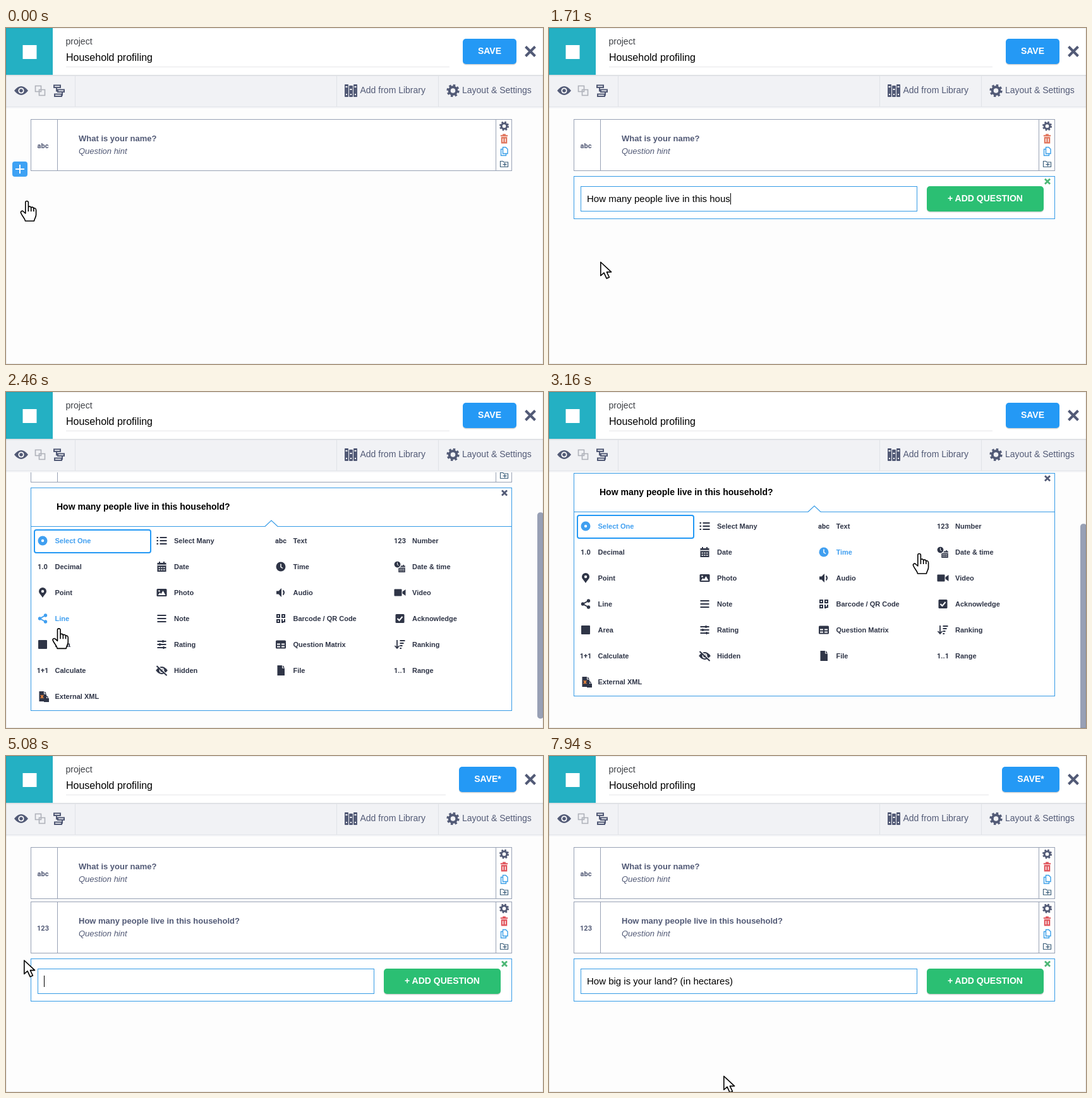
Write an HTML page that moves like this. It is 850 by 531 pixels and loops after 8000 ms.

```html
<!DOCTYPE html>
<html lang="en">
<head>
<meta charset="utf-8">
<title>Form builder</title>
<style>
html, body { margin: 0; width: 100%; height: 100%; overflow: hidden; background: #fdfdfd; }
svg { display: block; font-family: "Liberation Sans", Arial, sans-serif; }
#stage { width: 100%; height: 100%; }
text { white-space: pre; }
.glyph { font: bold 11px Roboto, sans-serif; text-anchor: middle; }
.ink { fill: currentColor; }
.line { fill: none; stroke: currentColor; stroke-width: 2; }
.white { fill: #fff; }
.cut { fill: none; stroke: #fff; stroke-width: 1.5; }
</style>
</head>
<body>
<svg id="stage" viewBox="0 0 850 531"></svg>
<script>
const LOOP = 8000;
const BLUE = '#2499f5', SLATE = '#525a76', DARK = '#2f3547', GREEN = '#2bbf73';
const FIRST = 'How many people live in this household?';
const SECOND = 'How big is your land? (in hectares)';

// drawing helpers
const path = (d, cls = 'ink', extra = '') => `<path class="${cls}" d="${d}" ${extra}/>`;
const rect = (x, y, w, h, attrs) => `<rect x="${x}" y="${y}" width="${w}" height="${h}" ${attrs}/>`;
const disc = (x, y, r, cls = 'ink') => `<circle class="${cls}" cx="${x}" cy="${y}" r="${r}"/>`;
const label = (x, y, size, fill, str, extra = '') =>
  `<text x="${x}" y="${y}" font-size="${size}" fill="${fill}" ${extra}>${str.replace(/&/g, '&amp;')}</text>`;
const at = (x, y, color, body, scale = 1) =>
  `<g transform="translate(${x} ${y}) scale(${scale})" style="color:${color}">${body}</g>`;
const glyph = str => `<text class="glyph ink" y="4">${str}</text>`;
const outline = color => `fill="none" stroke="${color}"`;
const BOLD = 'font-weight="bold"';

// icons, centred on 0,0
const eye = path('M-11 0Q0-14 11 0Q0 14-11 0Z') + disc(0, 0, 4.6, 'white') + disc(0, 0, 2.8);
const gear = '<circle class="line" r="5.8" style="stroke-width:4"/>' +
  '<circle class="line" r="8.6" style="stroke-width:3" stroke-dasharray="3.5 3.254"/>';
const cross = path('M-4-4L4 4M4-4L-4 4', 'line', 'style="stroke-width:2.8"');
const bars = path('M-7-5H7M-7 0H7M-7 5H7', 'line');
const clock = disc(0, 0, 7.5) + path('M0-4.5V.5L3 2.5', 'cut');
const calendar = path('M-7-6h2.500v-2h2v2h5v-2h2v2H7V8H-7Z') +
  path('M-7-2.500H7', 'cut') + path('M-5 1.500H5M-5 5H5', 'cut', 'stroke-dasharray="2.500 1.250"');
const page = path('M-5.500-8H2V-3.500H6V8H-5.500ZM3-8L6-4.500H3Z');
const trash = path('M-6-6h3.500v-2h5v2H6v2H-6ZM-5-3H5V8H-5Z') + path('M-2-.500V5.500M2-.500V5.500', 'cut');
const copy = path('M-2-6.500H2.500L5.500-3.500V3.500H-2Z M-2-3.500H-5V6.500H3V3.500', 'line', 'style="stroke-width:1.4"');
const folder = path('M-6-4.500h4l1.500 1.500H6V4.500H-6Z', 'line', 'style="stroke-width:1.2"') +
  path('M-2 .700H4M1-2V3.500', 'line', 'style="stroke-width:1.3"');

const ITEMS = [
  ['Select One', disc(0, 0, 7.5) + disc(0, 0, 2.2, 'white')],
  ['Select Many', path('M-3-5H8M-3 0H8M-3 5H8M-8-5h2.500M-8 0h2.500M-8 5h2.500', 'line')],
  ['Text', glyph('abc')],
  ['Number', glyph('123')],
  ['Decimal', glyph('1.0')],
  ['Date', calendar],
  ['Time', clock],
  ['Date & time', `<g transform="translate(3 3) scale(.75)">${calendar}</g>` + disc(-3.5, -3, 5.5, 'white') +
    `<g transform="translate(-4 -3.500) scale(.65)">${clock}</g>`],
  ['Point', path('M0 8C-3 3-6 1-6-2A6 6 0 0 1 6-2C6 1 3 3 0 8Z') + disc(0, -2, 2.2, 'white')],
  ['Photo', rect(-8, -6, 16, 12, 'rx="1.5" class="ink"') + path('M-6 4l3-4 2 2 3-5 4 7Z', 'white') + disc(-4, -2.5, 1.3, 'white')],
  ['Audio', path('M-7-2.500h3.500L1-7V7L-3.500 2.500H-7Z') + path('M3.500-3.500Q6.500 0 3.500 3.500', 'line')],
  ['Video', rect(-9, -5.500, 12, 11, 'rx="1" class="ink"') + path('M4-1.500L9-5V5L4 1.500Z')],
  ['Line', disc(4.5, -5, 2.7) + disc(-4.5, 0, 2.7) + disc(4.5, 5, 2.7) + path('M4.500-5L-4.500 0L4.500 5', 'line')],
  ['Note', bars],
  ['Barcode / QR Code', path('M-6-6h4v4h-4ZM2-6h4v4h-4ZM-6 2h4v4h-4Z', 'line') + path('M1 1h2v3h2v-3h2v5h-3v1h-3Z')],
  ['Acknowledge', rect(-7, -7, 14, 14, 'rx="1.5" class="ink"') + path('M-4 0L-1 3L4-3', 'cut', 'style="stroke-width:2"')],
  ['Area', rect(-7, -7, 14, 14, 'rx="1" class="ink"')],
  ['Rating', bars + path('M2-7v4M-3-2v4M3 3v4', 'line')],
  ['Question Matrix', rect(-8, -6.500, 16, 13, 'rx="1.5" class="ink"') + path('M-6-1.500H6V4.500H-6ZM-6 1.500H6M0-1.500V4.500', 'white') +
    path('M-6 1.500H6M0-2V5', 'line')],
  ['Ranking', path('M-4.500-7V5M-8 2L-4.500 6L-1 2M0-6H8M0-2H6M0 2H4M0 6H2.500', 'line', 'style="stroke-width:1.8"')],
  ['Calculate', glyph('1+1')],
  ['Hidden', `<g transform="scale(.85)">${eye}</g>` + path('M-7-8L9 7', 'cut') + path('M-8-7L8 8', 'line')],
  ['File', page],
  ['Range', glyph('1..1')],
  ['External XML', page + path('M-3-2L1 3M1-2L-3 3', 'line', 'style="color:#e9853d"') + path('M2 3h8v6H2Z') +
    path('M4 3v-2q2-2 4 0v2', 'line', 'style="stroke-width:1.3"')]
];
const COL = 188.5, ROW = 41, MENU_TOP = 300;

// pointer: time, x, y of the hot spot, shape; moves in 100 ms steps
const POINTER = [
  [0, 33, 273, 'hand'], [300, 25, 225, 'hand'], [500, 25, 225, 'arrow'], [780, 81, 369, 'arrow'],
  [1860, 81, 369, 'hand'], [2260, 81, 368, 'hand'], [2560, 85, 376, 'hand'], [3160, 586, 255, 'hand'],
  [3380, 631, 216, 'hand'], [3480, 631, 216, 'hand'], [3680, 641, 197, 'hand'], [3780, 641, 197, 'hand'],
  [3880, 630, 215, 'arrow'], [4080, 570, 355, 'arrow'], [4580, 28, 313, 'hand'], [4880, 28, 313, 'hand'],
  [4980, 28, 317, 'arrow'], [5080, 28, 322, 'arrow'], [5500, 28, 322, 'arrow'], [5800, 57, 365, 'beam'],
  [7640, 57, 365, 'arrow'], [7940, 276, 505, 'arrow'], [LOOP, 276, 505, 'arrow']
];
// typed characters over time
const TYPED_FIRST = [[770, 0], [880, 4], [920, 5], [1710, 33]];
const TYPED_SECOND = [[5640, 0], [6400, 19], [6460, 20], [7240, 26], [7280, 27], [7600, 35]];

const PEN = 'fill="#fff" stroke="#000" stroke-width="1.6" stroke-linejoin="round"';
const BEAM = 'M-6.500-14H-2Q0-14 0-12Q0-14 2-14H6.500M0-12V12M-6.500 14H-2Q0 14 0 12Q0 14 2 14H6.500';
const SHAPES = {
  arrow: path('M.8 1V22.500L6 17.800L10.200 26.800L14.400 25L10.400 16.600H17.600Z', '', PEN),
  hand: path('M-2.200 20V2.600C-2.200-.200 2.400-.200 2.400 2.600V11C2.400 8 6.500 8.500 6.700 11.500C7 9.500 10.700 9.500 10.800 12.500' +
    'C11.500 11 14.600 11.500 14.600 15V22C14.600 26 12 28 11.500 32H-2.500C-3 28-7 25-9.300 19.500C-10.500 17-7.500 15-5.500 17Z' +
    'M2.400 11V17M6.700 11.500V17M10.800 12.500V17', '', PEN),
  beam: path(BEAM, '', 'fill="none" stroke="#000" stroke-width="3.8"') + path(BEAM, '', 'fill="none" stroke="#fff" stroke-width=".8"')
};

const mix = (a, b, u) => a + (b - a) * u;
const clamp = u => Math.max(0, Math.min(1, u));
const swing = u => .5 - Math.cos(Math.PI * clamp(u)) / 2;

function pointerAt(t) {
  const i = POINTER.findLastIndex(k => k[0] <= t);
  const a = POINTER[i], b = POINTER[i + 1] || a;
  const u = b === a ? 0 : Math.floor((t - a[0]) / 100) * 100 / (b[0] - a[0]);
  return { x: mix(a[1], b[1], u), y: mix(a[2], b[2], u), shape: a[3] };
}

function typedAt(keys, t) {
  const i = keys.findLastIndex(k => k[0] <= t);
  if (i < 0) return 0;
  const a = keys[i], b = keys[i + 1];
  return b ? Math.floor(mix(a[1], b[1], (t - a[0]) / (b[0] - a[0])) + 1e-6) : a[1];
}

const pen = document.createElement('canvas').getContext('2d');
pen.font = '15px "Liberation Sans", Arial, sans-serif';

function question(y, kind, title, red) {
  const edge = outline('#98a2b5');
  return rect(39.5, y + .5, 761, 81, 'fill="#fff" stroke="#98a2b5"') +
    path(`M81.500 ${y}v82M775.500 ${y}v82`, '', edge) +
    at(58.5, y + 41.5, SLATE, glyph(kind)) +
    label(115, y + 35, 13, SLATE, title, BOLD) +
    label(115, y + 55, 13, SLATE, 'Question hint', 'font-style="italic"') +
    at(788.5, y + 11, SLATE, gear, .75) + at(788.5, y + 31, red, trash, .95) +
    at(788.5, y + 51, '#3a9fe8', copy) + at(788.5, y + 71, '#40627d', folder);
}

function button(x, y, w, color, str) {
  return rect(x, y + 1.5, w, 40, 'rx="5" fill="#000" opacity=".16"') + rect(x, y, w, 40, `rx="5" fill="${color}"`) +
    label(x + w / 2, y + 24, 14, '#fff', str, BOLD + ' text-anchor="middle"');
}

const plus = y => rect(10, y, 24, 24, 'rx="4" fill="#3ea2f4"') + path(`M15 ${y + 12}h14M22 ${y + 5}v14`, 'cut', 'style="stroke-width:2"');

function entry(y, str, caret) {
  const x = 60 + pen.measureText(str).width;
  return rect(39.5, y + .5, 761, 67, 'fill="#fff" stroke="#369be6"') +
    rect(50.5, y + 16.5, 532, 39, 'fill="#fff" stroke="#369be6"') +
    label(60, y + 41, 15, '#000', str) +
    (caret ? rect(Math.round(x), y + 27, 1, 18, 'fill="#000"') : '') +
    button(598, y + 16, 185, GREEN, '+ ADD QUESTION') + at(789, y + 8.5, '#4db776', cross);
}

function menu(height, pointer, scroll) {
  const col = Math.floor((pointer.x - 44) / COL);
  const row = Math.floor((pointer.y + scroll - MENU_TOP) / ROW);
  const hovered = row * 4 + col;
  const list = ITEMS.map(([name, icon], i) => {
    const x = 58 + i % 4 * COL, y = 318 + Math.floor(i / 4) * ROW;
    const lit = i === 0 || i === hovered;
    return at(x, y, lit ? '#409ff0' : DARK, icon) + label(x + 19.5, y + 3.5, 11, lit ? '#409ff0' : DARK, name, BOLD);
  }).join('');
  return rect(39.5, 234.5, 761, 60 + height, 'fill="#fff" stroke="#369be6"') +
    label(80, 269, 14, '#000', FIRST, BOLD) + at(789, 242.5, SLATE, cross) +
    `<svg x="0" y="280" width="850" height="${15 + height}" viewBox="0 280 850 ${15 + height}">` +
    path('M40 295.500H410L420 286L430 295.500H800', '', outline('#369be6') + ' stroke-width="1.2"') +
    rect(45, 301, 184, 36, `rx="3" ${outline(BLUE)} stroke-width="2"`) + list + '</svg>';
}

function header(saved) {
  const saveX = saved ? 723 : 717;
  const books = [0, 7, 14].map(x => rect(536 + x, x === 7 ? 91 : 89, 6, x === 7 ? 18 : 20, `rx="1" fill="${SLATE}"`) +
    rect(537.5 + x, x === 7 ? 96 : 92, 3, 2, 'fill="#fff"') + rect(538 + x, 104, 2, 2, 'fill="#fff"')).join('');
  return rect(0, 0, 850, 127, 'fill="#f4f5f7"') + rect(0, 0, 850, 125, 'fill="#f1f2f5"') +
    rect(0, 124, 850, 1, 'fill="#e3e5e9"') + rect(0, 74, 850, 2, 'fill="#dfe1e5"') + rect(0, 0, 850, 74, 'fill="#fff"') +
    rect(0, 0, 74, 74, 'fill="#24b0c3"') + rect(26.5, 27, 22, 22, 'fill="#fff"') +
    label(94.5, 26, 14, '#3f4247', 'project') + label(95, 52, 16, '#000', 'Household profiling') +
    rect(95, 61, saveX - 116, 1, 'fill="#e6e7ea"') + button(saveX, 17, 808 - saveX, BLUE, saved ? 'SAVE' : 'SAVE*') +
    at(830, 37, SLATE, path('M-7.500-7.500L7.500 7.500M7.500-7.500L-7.500 7.500', 'line', 'style="stroke-width:4"')) +
    path('M109.500 76V124M523.500 76V124M684.500 76V124', '', outline('#e0e2e7')) +
    at(24, 99, SLATE, eye) +
    path('M46.500 91.500h9v9h-9ZM52.500 97.500h9v9h-9Z', '', outline('#aeb1b9') + ' stroke-width="1.6"') +
    at(84, 99, SLATE, path('M-8-8.500H2V-5H-8ZM-2-1.500H8V2H-2ZM-7 5.500H4V9H-7ZM-4-5V.500H-2M5 2V7H4', 'line')) +
    books + label(560.5, 103, 14, SLATE, 'Add from Library') +
    at(707.5, 99, SLATE, gear) + label(722, 103, 14, SLATE, 'Layout & Settings');
}

function scene(t) {
  const saved = t < 3880, menuOpen = t >= 1810 && saved;
  const pointer = pointerAt(t);
  const stepped = t < 2260 ? 0 : 2260 + Math.floor((t - 2260) / 100) * 100;
  const scroll = menuOpen ? Math.round(106 * swing((stepped - 2236) / 324)) : 0;
  const red = saved ? '#e0735a' : '#e0525a';
  let rows = question(144, 'abc', 'What is your name?', red), bar = '';
  if (t < 500) rows += plus(211);
  else if (t < 1810) rows += entry(234, FIRST.slice(0, typedAt(TYPED_FIRST, t)), true);
  else if (menuOpen) {
    const height = 292 * swing((t - 1770) / 300);
    rows += menu(height, pointer, scroll);
    if (height > 236) bar = rect(841, 125 + scroll * .785, 10, 326, 'rx="4.5" fill="#98a0b5"');
  } else {
    rows += question(230, '123', FIRST, red);
    rows += t < 4980 ? plus(297) : entry(320, SECOND.slice(0, typedAt(TYPED_SECOND, t)), t < 7900);
  }
  return rect(0, 0, 850, 531, 'fill="#fdfdfd"') + `<g transform="translate(0 ${-scroll})">${rows}</g>` + bar +
    header(saved) + rect(.5, .5, 849, 530, `${outline('#000')} opacity=".08"`) +
    at(pointer.x, pointer.y, '#000', SHAPES[pointer.shape]);
}

const stage = document.getElementById('stage');
const start = performance.now();
let shown = '';
function tick() {
  const next = scene((performance.now() - start) % LOOP);
  if (next !== shown) stage.innerHTML = shown = next;
  requestAnimationFrame(tick);
}
tick();
</script>
</body>
</html>
```
